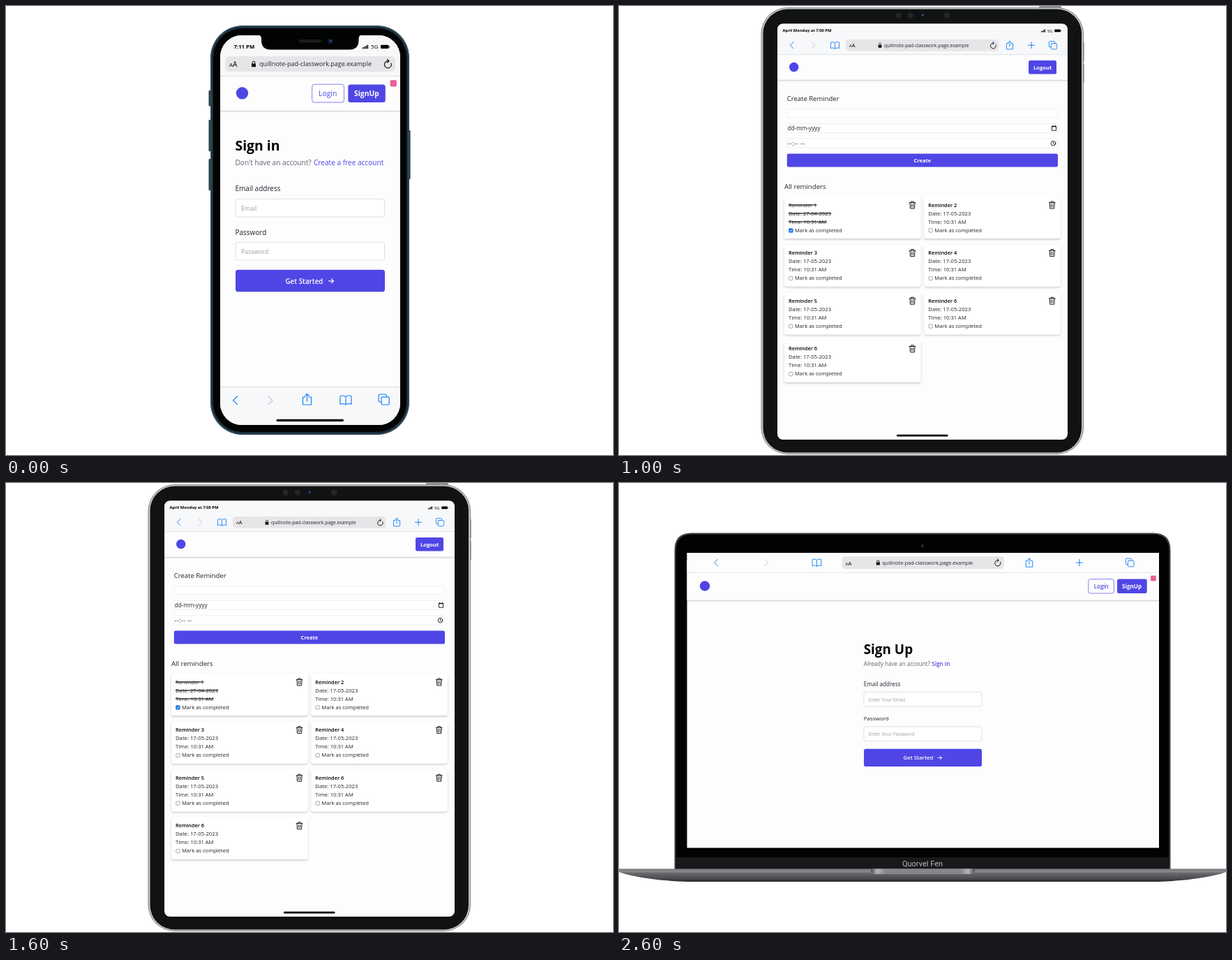
Animation of 870 by 643 pixels, one loop 3000 ms. Source, as an HTML page:

```html
<!DOCTYPE html>
<html lang="en">
<head>
<meta charset="utf-8">
<title>Reminder app on three devices</title>
<style>
html, body { margin: 0; width: 100%; height: 100%; overflow: hidden; background: #fff; }
svg.stage { display: block; width: 100vw; height: 100vh; }
text { font-family: "Open Sans", "Noto Sans", sans-serif; white-space: pre; }

.scene { visibility: hidden; animation: show 3s step-end infinite; }
.tablet { animation-delay: -2s; }
.laptop { animation-delay: -1s; }
@keyframes show {
  0% { visibility: visible; }
  33.3333%, 100% { visibility: hidden; }
}

.bar { fill: #f7f8fa; }
.pill { fill: #e6e6e8; }
.rule { fill: #dcdee2; }
.page { fill: #fdfdfe; }
.head { fill: #fdfdfe; filter: url(#drop); }
.main, .link { fill: #4f46e5; }
.line { fill: #fff; stroke: #8780ee; }
.field { fill: #fff; stroke: #dcdfe4; }
.faint { fill: #fff; stroke: #eff0f3; }
.pink { fill: #ec5f92; stroke: #e04a85; stroke-width: .6; }
.card { fill: #fff; filter: url(#lift); }
.icon { fill: none; stroke: #1a82f7; stroke-width: 1.2; stroke-linejoin: round; stroke-linecap: round; }
.off { stroke: #c3c6cb; }
.ink { stroke: #111; }
.wht { stroke: #fff; }
.b { font-weight: 700; }
.s { font-weight: 600; }
.m { font-weight: 500; }
.w { fill: #fff; }
.grey { fill: #60656f; }
.hint { fill: #979ca6; }
.dark { fill: #20242c; }
.done { text-decoration: line-through; }
</style>
</head>
<body>
<svg class="stage" viewBox="0 0 870 643" preserveAspectRatio="none">
<defs>
  <filter id="drop" x="-5%" y="-10%" width="110%" height="130%">
    <feDropShadow dx="0" dy="1.2" stdDeviation="1" flood-color="#000" flood-opacity=".24"/>
  </filter>
  <filter id="lift" x="-5%" y="-10%" width="110%" height="130%">
    <feDropShadow dx="0" dy="1.6" stdDeviation="1.6" flood-color="#000" flood-opacity=".2"/>
  </filter>
  <linearGradient id="deck" x2="0" y2="1">
    <stop offset="0" stop-color="#77777b"/>
    <stop offset=".22" stop-color="#8a8a8e"/>
    <stop offset=".35" stop-color="#66666b"/>
    <stop offset=".75" stop-color="#4b4b50"/>
    <stop offset="1" stop-color="#29292c"/>
  </linearGradient>
  <linearGradient id="dip">
    <stop offset="0" stop-color="#4d4d51"/>
    <stop offset=".06" stop-color="#b5b5b9"/>
    <stop offset=".14" stop-color="#87878b"/>
    <stop offset=".86" stop-color="#87878b"/>
    <stop offset=".94" stop-color="#b5b5b9"/>
    <stop offset="1" stop-color="#4d4d51"/>
  </linearGradient>
  <clipPath id="phoneScreen"><rect x="307" y="42" width="258" height="558" rx="31"/></clipPath>
  <clipPath id="tabletScreen"><rect x="227" y="25.5" width="416" height="595.5" rx="8"/></clipPath>

  <path id="back" d="M3 -5.8L-3 0L3 5.8"/>
  <path id="next" d="M-3 -5.8L3 0L-3 5.8"/>
  <path id="share" d="M-2.6 -4H-6V7H6V-4H2.6M0 2V-8.5M-3 -5.6L0 -8.5L3 -5.6"/>
  <path id="book" d="M0 -4.6C-2 -6.8 -6 -6.6 -8 -5.4V6C-6 4.8 -2 4.8 0 6.6C2 4.8 6 4.8 8 6V-5.4C6 -6.6 2 -6.8 0 -4.6V6.6"/>
  <path id="plus" d="M-5.5 0H5.5M0 -5.5V5.5"/>
  <path id="tabs" d="M-3.6 3.4H-6Q-7.5 3.4 -7.5 2V-6Q-7.5 -7.5 -6 -7.5H2Q3.6 -7.5 3.6 -6V-3.6M-2.1 -3.6H6Q7.5 -3.6 7.5 -2.1V6Q7.5 7.5 6 7.5H-2.1Q-3.6 7.5 -3.6 6V-2.1Q-3.6 -3.6 -2.1 -3.6Z"/>
  <path id="reload" d="M4.6 -1.4A5 5 0 1 1 0.8 -4.6M-1 -7L1.6 -4.6L-1 -2.4"/>
  <path id="arrow" d="M-3.5 0H3.5M.6 -2.9L3.5 0L.6 2.9"/>
  <g id="lock">
    <rect x="-3" y="-.6" width="6" height="4.8" rx=".8" fill="#111"/>
    <path d="M-1.9 0V-2A1.9 1.9 0 0 1 1.9 -2V0" fill="none" stroke="#111"/>
  </g>
  <g id="status">
    <path d="M0 1h1.5v2H0zM2.2 0h1.5v3H2.2zM4.4 -1.3h1.5v4.3H4.4zM6.6 -2.6h1.5v5.6H6.6z"/>
    <text class="m" x="12" y="3" font-size="8">5G</text>
    <rect x="26" y="-2.4" width="11.5" height="5.2" rx="1.2"/>
    <rect x="38" y="-.9" width="1" height="2.2" rx=".5"/>
  </g>
  <g id="trash" class="icon ink" stroke-width="1">
    <path d="M-4.4 -3.3H4.4M-1.8 -3.5V-5H1.8V-3.5M-3.5 -3.2L-3 5H3L3.5 -3.2M-1.2 -1.2V3M1.2 -1.2V3" style="stroke-width:.95"/>
  </g>
  <g id="card">
    <rect class="card" width="195.5" height="60" rx="3"/>
    <use href="#trash" x="183.5" y="12"/>
    <rect x="6.8" y="45.8" width="5.2" height="5.2" rx=".8" fill="#fff" stroke="#858585" stroke-width=".7"/>
    <text class="dark" x="15" y="50.7" font-size="7.6">Mark as completed</text>
  </g>
  <g id="due">
    <use href="#card"/>
    <text class="dark" x="6" y="26.7" font-size="7.7">Date: 17-05-2023</text>
    <text class="dark" x="6" y="38.7" font-size="7.6">Time: 10:31 AM</text>
  </g>
</defs>

<g class="scene phone">
  <g fill="#2b414e">
    <rect x="290.5" y="121" width="4" height="22.5" rx="1"/>
    <rect x="290.5" y="163" width="4" height="45" rx="1"/>
    <rect x="290.5" y="219" width="4" height="45" rx="1"/>
    <rect x="576" y="178" width="3.6" height="70" rx="1"/>
  </g>
  <rect x="293" y="28" width="285" height="586" rx="46" fill="#1c2d38"/>
  <rect x="294" y="29" width="283" height="584" rx="45" fill="none" stroke="#3d5867" stroke-width="1.2"/>
  <rect x="297" y="32" width="277" height="578" rx="42" fill="#020303"/>
  <g clip-path="url(#phoneScreen)">
    <rect class="page" x="307" y="42" width="258" height="558"/>
    <rect class="head" x="300" y="90" width="272" height="59.5"/>
    <rect class="bar" x="307" y="42" width="258" height="58"/>
    <rect class="rule" x="307" y="100" width="258" height="1"/>
    <rect class="bar" x="307" y="545" width="258" height="55"/>
    <rect class="rule" x="307" y="545" width="258" height="1"/>
  </g>
  <path d="M361 41H510Q505.500 42 505.500 47V49Q505.500 62.500 492 62.500H379.500Q366 62.500 366 49V47Q366 42 361 41Z" fill="#020303"/>
  <rect x="419.500" y="48" width="32.500" height="4.500" rx="2.200" fill="#1c1c1e"/>
  <circle cx="465" cy="50.500" r="4" fill="#0d1a2c"/>
  <circle cx="465" cy="50" r="1.500" fill="#234f86"/>
  <text class="b" x="326.500" y="61" font-size="7.800">7:11 PM</text>
  <use href="#status" x="511" y="58.200"/>
  <rect class="pill" x="314" y="72" width="244" height="22" rx="6"/>
  <text x="320" y="86.500" font-size="7.800">A<tspan font-size="10">A</tspan></text>
  <use href="#lock" x="355" y="83"/>
  <text class="dark" x="363" y="86.300" font-size="9">quillnote-pad-classwork.page.example</text>
  <use href="#reload" class="icon ink" x="547.500" y="83.500"/>

  <circle class="main" cx="338.500" cy="124.800" r="8.700"/>
  <rect class="line" x="438.700" y="112.200" width="45.800" height="25.800" rx="3.500"/>
  <text class="link m" x="448" y="128.800" font-size="10.400">Login</text>
  <rect class="main" x="490.300" y="112.500" width="53.500" height="25.500" rx="3.500"/>
  <text class="w b" x="499" y="128.800" font-size="10.300">SignUp</text>
  <rect class="pink" x="551" y="106.500" width="8.500" height="8.500" rx="1"/>

  <text class="b" x="328.500" y="206.800" font-size="19.400">Sign in</text>
  <text class="grey" x="328.500" y="228.200" font-size="10.100">Don't have an account?</text>
  <text class="link m" x="441" y="228.200" font-size="10.100">Create a free account</text>
  <text class="dark m" x="328.500" y="265.200" font-size="10">Email address</text>
  <rect class="field" x="329" y="276.200" width="213.500" height="25.800" rx="3.500"/>
  <text class="hint" x="337" y="292.600" font-size="8.700">Email</text>
  <text class="dark m" x="328.500" y="327.600" font-size="10">Password</text>
  <rect class="field" x="329" y="338.200" width="213.500" height="25.800" rx="3.500"/>
  <text class="hint" x="337" y="354.900" font-size="8.700">Password</text>
  <rect class="main" x="329" y="377.700" width="214" height="31.500" rx="3.500"/>
  <text class="w s" x="400.500" y="397.700" font-size="9.800">Get Started</text>
  <use href="#arrow" class="icon wht" x="466" y="393.800"/>

  <g class="icon">
    <use href="#back" x="328.500" y="564.800"/>
    <use href="#next" class="off" x="379" y="564.800"/>
    <use href="#share" x="431.500" y="564"/>
    <use href="#book" x="487" y="564.300"/>
    <use href="#tabs" x="541.700" y="563.500"/>
  </g>
  <rect x="387.500" y="591.700" width="96.500" height="3.200" rx="1.600"/>
</g>

<g class="scene tablet">
  <rect x="602" y="0" width="32" height="4" rx="1" fill="#909392"/>
  <path d="M666 52v27M666 83v27" stroke="#a9acab" stroke-width="2"/>
  <rect x="203.500" y="2" width="462.500" height="640" rx="38" fill="#848887"/>
  <rect x="204.600" y="3" width="460.300" height="638" rx="37" fill="#c4c7c6"/>
  <rect x="206.500" y="4.500" width="456.500" height="635" rx="35" fill="#111212"/>
  <g fill="#242529">
    <circle cx="400.500" cy="13.500" r="4.200"/>
    <circle cx="418" cy="13.500" r="4.200"/>
    <circle cx="470" cy="13.500" r="4.500"/>
    <circle cx="435" cy="13.500" r="3" fill="#0c1930"/>
    <circle cx="435.300" cy="13" r="1.200" fill="#3269a8"/>
  </g>
  <g clip-path="url(#tabletScreen)">
    <rect class="page" x="227" y="25" width="416" height="597"/>
    <rect class="head" x="220" y="60" width="430" height="45.500"/>
    <rect class="bar" x="227" y="25" width="416" height="44.500"/>
    <rect class="rule" x="227" y="69.300" width="416" height=".8"/>
  </g>
  <text class="b" x="234.500" y="37.200" font-size="5.800">April Monday at 7:00 PM</text>
  <use href="#status" transform="translate(605 35.300) scale(.74)"/>
  <rect class="pill" x="325" y="48" width="219.500" height="16.500" rx="4.500"/>
  <text x="330" y="59" font-size="5.800">A<tspan font-size="7.500">A</tspan></text>
  <use href="#lock" transform="translate(374 56.300) scale(.8)"/>
  <text class="dark" x="380" y="58.900" font-size="6.800">quillnote-pad-classwork.page.example</text>
  <g class="icon">
    <use href="#reload" class="ink" transform="translate(536.500 56.800) scale(.77)"/>
    <use href="#back" transform="translate(247.700 56.200) scale(.8)"/>
    <use href="#next" class="off" transform="translate(278.500 56.200) scale(.8)"/>
    <use href="#book" transform="translate(309.500 56.200) scale(.75)"/>
    <use href="#share" transform="translate(560 56.600) scale(.76)"/>
    <use href="#plus" transform="translate(591 56.200) scale(.82)"/>
    <use href="#tabs" transform="translate(622 56.200) scale(.75)"/>
  </g>
  <circle class="main" cx="250.700" cy="87.500" r="6.700"/>
  <rect class="main" x="587" y="78" width="40" height="19.500" rx="2.500"/>
  <text class="w b" x="594" y="90.500" font-size="7.600">Logout</text>

  <text class="dark m" x="240.800" y="136.200" font-size="9.500">Create Reminder</text>
  <rect class="faint" x="240.800" y="147.700" width="388" height="12"/>
  <rect class="faint" x="240.800" y="168.500" width="388" height="13"/>
  <rect class="faint" x="240.800" y="190" width="388" height="13"/>
  <text class="dark" x="241.500" y="178.300" font-size="8.200">dd-mm-yyyy</text>
  <text class="dark" x="241.700" y="199.800" font-size="8.200" letter-spacing=".6">--:-- --</text>
  <path d="M620.500 172.500H626.500V178.300H620.500Z" fill="none" stroke="#111" stroke-width=".9"/>
  <path d="M620 172.700H627M621.700 171V173M625.300 171V173" stroke="#111" stroke-width="1.300"/>
  <g class="icon ink">
    <circle cx="622.500" cy="196.700" r="3.300" style="stroke-width:.9"/>
    <path d="M622.500 194.700V196.800L624 197.700" style="stroke-width:.8"/>
  </g>
  <rect class="main" x="240.800" y="211.500" width="388.200" height="19" rx="2.500"/>
  <text class="w b" x="434.900" y="223.800" font-size="7.500" text-anchor="middle">Create</text>
  <text class="dark m" x="237" y="261.700" font-size="9.600">All reminders</text>

  <g transform="translate(237 273)">
    <use href="#card"/>
    <g class="dark done">
      <text class="m done" x="6" y="14.700" font-size="7.500">Reminder 1</text>
      <text class="done" x="6" y="26.700" font-size="7.700">Date: 27-04-2023</text>
      <text class="done" x="6" y="38.700" font-size="7.600">Time: 10:31 AM</text>
    </g>
    <rect x="6.400" y="45.400" width="6" height="6" rx="1" fill="#0b74e8"/>
    <path d="M7.700 48.500L9 49.900L11.200 46.900" fill="none" stroke="#fff" stroke-width=".9"/>
  </g>
  <g class="s" font-size="7.400">
    <g transform="translate(437.300 273)"><use href="#due" font-weight="400"/><text x="6" y="14.700">Reminder 2</text></g>
    <g transform="translate(237 341.600)"><use href="#due" style="font-weight:400"/><text x="6" y="14.700">Reminder 3</text></g>
    <g transform="translate(437.300 341.600)"><use href="#due" style="font-weight:400"/><text x="6" y="14.700">Reminder 4</text></g>
    <g transform="translate(237 410.200)"><use href="#due" style="font-weight:400"/><text x="6" y="14.700">Reminder 5</text></g>
    <g transform="translate(437.300 410.200)"><use href="#due" style="font-weight:400"/><text x="6" y="14.700">Reminder 6</text></g>
    <g transform="translate(237 478.800)"><use href="#due" style="font-weight:400"/><text x="6" y="14.700">Reminder 6</text></g>
  </g>
  <rect x="398" y="613.800" width="73.500" height="2.800" rx="1.400"/>
</g>

<g class="scene laptop">
  <path d="M79.500 553V96Q79.500 71.500 104 71.500H766Q790.500 71.500 790.500 96V553Z" fill="#3f4143"/>
  <path d="M81.500 553V97Q81.500 73.500 105 73.500H765Q788.500 73.500 788.500 97V553Z" fill="#020202"/>
  <rect x="82" y="536" width="706" height="17" fill="#19191b"/>
  <circle cx="435" cy="90" r="2.300" fill="#25272a"/>
  <rect class="page" x="97.500" y="100" width="676.500" height="422.500"/>
  <svg x="97.500" y="100" width="676.500" height="75" viewBox="97.500 100 676.500 75">
    <rect class="head" x="90" y="110" width="692" height="57.500"/>
    <rect class="page" x="97.500" y="100" width="676.500" height="28"/>
    <rect class="rule" x="97.500" y="127.800" width="676.500" height=".8"/>
  </svg>
  <rect class="pill" x="319.500" y="105" width="232.500" height="18" rx="4.500"/>
  <text x="324.500" y="117.500" font-size="6">A<tspan font-size="8">A</tspan></text>
  <use href="#lock" transform="translate(371.300 114) scale(.85)"/>
  <text class="dark" x="377.500" y="116.700" font-size="7.250">quillnote-pad-classwork.page.example</text>
  <g class="icon">
    <use href="#reload" class="ink" transform="translate(543 114.500) scale(.82)"/>
    <use href="#back" transform="translate(139 114) scale(.82)"/>
    <use href="#next" class="off" transform="translate(211.200 114) scale(.82)"/>
    <use href="#book" transform="translate(283.500 114) scale(.8)"/>
    <use href="#share" transform="translate(588 114.600) scale(.8)"/>
    <use href="#plus" transform="translate(659.800 114) scale(.85)"/>
    <use href="#tabs" transform="translate(732.200 114) scale(.78)"/>
  </g>

  <circle class="main" cx="123" cy="147.500" r="7.200"/>
  <rect class="line" x="672.800" y="137.700" width="36.600" height="20.300" rx="2.800"/>
  <text class="link s" x="680.700" y="150.700" font-size="8">Login</text>
  <rect class="main" x="714" y="137.500" width="42.700" height="20.500" rx="2.800"/>
  <text class="w b" x="721" y="150.700" font-size="8.100">SignUp</text>
  <rect class="pink" x="762.300" y="133" width="7" height="7" rx=".8"/>

  <text class="b" x="350.700" y="245" font-size="18.900">Sign Up</text>
  <text class="grey" x="350.800" y="261.600" font-size="8.050">Already have an account?</text>
  <text class="link s" x="448.500" y="261.600" font-size="8">Sign In</text>
  <text class="dark m" x="350.800" y="291" font-size="8.100">Email address</text>
  <rect class="field" x="351" y="299.300" width="169" height="20.700" rx="2.800"/>
  <text class="hint" x="357.700" y="312.700" font-size="6.850">Enter Your Email</text>
  <text class="dark m" x="350.800" y="340.400" font-size="8">Password</text>
  <rect class="field" x="351" y="349" width="169" height="20.700" rx="2.800"/>
  <text class="hint" x="357.700" y="362.200" font-size="6.800">Enter Your Password</text>
  <rect class="main" x="351" y="380.800" width="169" height="25.200" rx="2.800"/>
  <text class="w s" x="407.500" y="396.400" font-size="7.800">Get Started</text>
  <use href="#arrow" class="icon wht" transform="translate(459.800 393.400) scale(.8)"/>

  <text x="435" y="548.600" font-size="11" text-anchor="middle" fill="#b9babd" style="font-family:Roboto,sans-serif">Quorvel Fen</text>
  <path d="M0 552.500H870V557C850 565 800 571 765 571H105C70 571 20 565 0 557Z" fill="url(#deck)"/>
  <path d="M361 552.500H510V555Q510 560 503 560H368Q361 560 361 555Z" fill="url(#dip)"/>
</g>
</svg>
</body>
</html>
```
